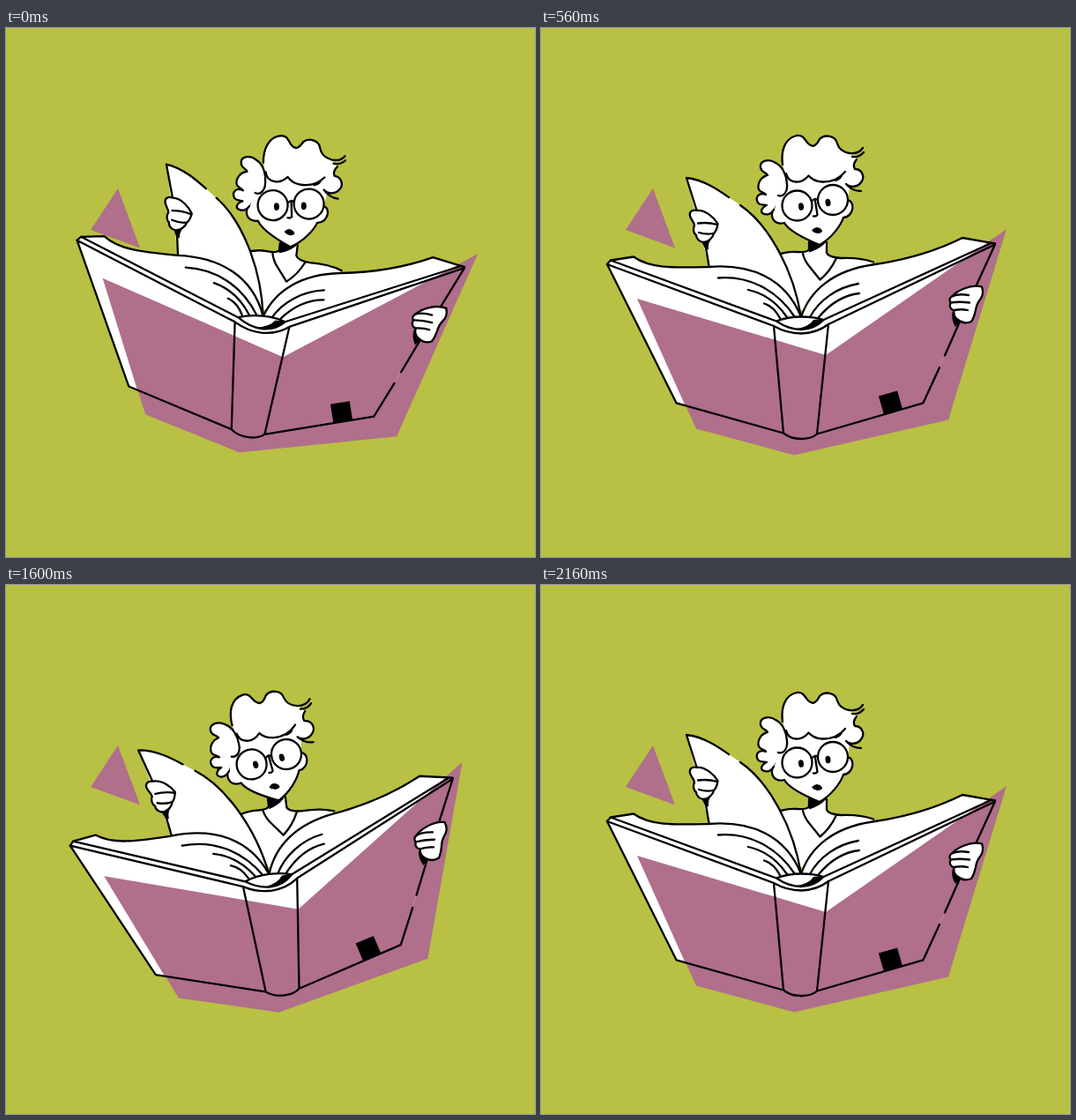
An HTML page for the animation above (2400 ms loop, 600 by 600 pixels).

```html
<!DOCTYPE html>
<html lang="en">
<head>
<meta charset="utf-8">
<title>Reader</title>
<style>
  html, body { margin: 0; width: 100%; height: 100%; overflow: hidden; background: #b8c143; }
  svg { display: block; width: 100%; height: 100%; }
  .ink { fill: none; stroke: #000; stroke-width: 2.3; stroke-linecap: round; stroke-linejoin: round; }
  .paper { fill: #fff; }
  .plum { fill: #b06f8b; }
</style>
</head>
<body>
<svg viewBox="0 0 600 600">
  <rect width="600" height="600" fill="#b8c143"/>
  <path id="shard" class="plum"/>

  <g id="figure">
    <path class="plum" d="M528 228L462 444.500L287 484.500L176 454.500L109 307L323 371Z"/>

    <g id="body">
      <path class="paper" d="M304 240V251Q302 255 290 254Q278 253 264 259L270 320H350L377 265.500Q362 260 340 261Q326 260 324 256V240Z"/>
      <path d="M303.500 240L316 246L326.500 237Q322 249 304 254.500Z"/>
      <path class="ink" d="M304 243V251Q302 255 290 254Q278 253 264 259M324 243V255Q326 260 340 261Q362 260 377 265.500M297 256Q299 264 304 270L316.500 285.500Q328 276 334.500 262"/>
    </g>

    <g id="head">
      <path class="paper ink" d="M274 203C264 198 259 211 264 218Q268 223 276 221C281 230 299 239 316 246C330 238 340 224 343 215C355 214 357 196 347 195"/>
      <path class="paper" d="M274 160L268 188L265 206L274 204L290 226L340 214L348 195L352 165Z"/>
      <path class="paper ink" d="M269 190C275 192 280 186 279 177C279 168 274 157 267 153.500C258 147 248 151 249 158C249.500 164 255 163 257 167C249 169 245 177 247 183C249 187 253 186 255 189C247 186 243 192 245.500 197C247 202 253 200 256 201C251 203 248 208 252 210.500C257 213 262 210 264 206"/>
      <path class="paper" d="M274 155C272 140 276 125 290 122C298 121 299 127 303 131C309 137 313 132 316 126C322 120 334 122 336 131C338 138 344 141 350 142L358 149Q353 155 356 160C364 160 368 169 363 175C359 181 350 181 346 177L345 165Q335 175 319 174.500Q309 174 303.500 167.500Q297 175 289.500 174.500Q280 174 278 165Z"/>
      <path class="ink" d="M274 155C272 140 276 125 290 122C298 121 299 127 303 131C309 137 313 132 316 126C322 120 334 122 336 131C338 138 344 141 350 142C358 143 363 139 365 136M353 146Q361 147 366 141M358 149Q353 155 356 160C364 160 368 169 363 175C359 181 350 181 346 177Q353 185 363 185M278 165Q280 174 289.500 174.500Q297 175 303.500 167.500Q309 174 319 174.500Q335 175 345 163M334 173Q340 171 341 167"/>
      <g class="ink">
        <circle class="paper" cx="290.500" cy="201.500" r="17"/>
        <circle class="paper" cx="331" cy="195" r="17"/>
        <path d="M307 197Q310 192 314 195M311 196L313.500 212Q312 214 309 213.500"/>
      </g>
      <g id="awed">
        <ellipse cx="295" cy="202.500" rx="3" ry="4.300" transform="rotate(-8 295 202.500)"/>
        <ellipse cx="325.500" cy="198" rx="3" ry="4.300" transform="rotate(-8 325.500 198)"/>
        <path d="M307 229.500Q311 224.500 315 226.500Q319 228 319 231Q316 234 312 232.500Q309 232 307 229.500Z"/>
      </g>
      <path id="glad" class="ink" d="M288.500 203.500Q295 197 300 202.500M322 200Q327 192 333 198M297.500 226Q315 236 329 223"/>
    </g>

    <path id="leaf" class="paper"/>
    <path id="leafLine" class="ink"/>
    <g id="leftHand">
      <path d="M182 242L195 237Q189 243 190 251L187 252Z"/>
      <path class="paper ink" d="M177 207C171 205.500 168 209 169 213C170 218 174 220 174 224C172 228 173 233 176 235C176 239 180 243 185 243C190 242 195 238 196 233C199 230 200 226 200.500 222C197 216 187 206 177 207Z"/>
      <path class="ink" d="M178 221.500Q189 220 200 223M179 232Q188 234.500 195 233"/>
    </g>

    <g id="book">
      <path class="paper" d="M75 268L153.500 425.300L275 459.500Q295 472 313 460.500L433.500 425.300L515 245.500L326 336Q295 355 264 338Z"/>
      <path class="paper" d="M75 268L79 263.500L105 259.500C124 273 150 272 190 271C238 267 278 284 295 328C305 297 332 275 376 268.500C415 263 450 252 478 238L515 244.500L326 336Q295 355 264 338Z"/>
      <path class="plum" d="M109 307L323 371L515 237.500V245.500L433.500 425.300L313 460.500Q295 472 275 459.500L163 427Z"/>
      <path class="ink" d="M75 268L79 263.500L105 259.500C124 273 150 272 190 271C238 267 278 284 295 328C305 297 332 275 376 268.500C415 263 450 252 478 238L515 244.500"/>
      <path class="ink" d="M201 283.500C235 281 267 296 288 328M235 297Q262 303 279 328M253 312.500Q264 316 271 329M360 290C336 294 315 309 305 328M361 301Q335 304 315 328"/>
      <path class="paper" d="M267 332.500Q280 327.500 295 327.500Q310 327.500 320.500 331Q310 342 295 342Q281 342 267 332.500Z"/>
      <path d="M288 341.500Q304 339 309 331Q315 330 320.500 331Q309 343 288 341.500Z"/>
      <path class="ink" d="M267 332.500Q280 327.500 295 327.500Q310 327.500 320.500 331Q310 342 295 342Q281 342 267 332.500L79 263.500M320.500 331L510.500 244"/>
      <path class="ink" d="M75 268L264 338Q279 346.500 295 346.500Q313 346 326 336L515 245.500L475 333M458 371.500L475 333M452 385L433.500 425.300L313 460.500Q307 466 295 466Q283 466 275 459.500L153.500 425.300L75 268M264 338L275 459.500M326 336L313 460.500"/>
      <rect x="-11" y="-11" width="22" height="22" transform="translate(396.500 425) rotate(-16)"/>
    </g>

    <g id="rightHand">
      <path d="M466.500 322Q465 331 470 339L476 333Z"/>
      <path class="paper ink" d="M466 304.500Q471 299 480 295.500Q491 291 500 293.500Q503 302 498 308Q494 313 493 320Q491 329 488 333Q480 336.500 473 331Q467 327 468.500 320.500Q462 318 464.500 311.500Q462 307 466 304.500Z"/>
      <path class="ink" d="M466 304.500Q473 301 485 303M464.500 311.500Q475 310 486 311.500M468.500 320Q477 318.500 484 320"/>
    </g>
  </g>
</svg>
<script>
  const LOOP = 2400;
  const el = id => document.getElementById(id);
  const set = (id, name, value) => el(id).setAttribute(name, value);
  const show = (id, on) => set(id, 'visibility', on ? 'visible' : 'hidden');

  const mid = 'rotate(0)';
  const big = 'translate(300 300) scale(1.1325) translate(-300 -300)';
  const tilt = a => `rotate(${a} 300 300)`;

  // One pose every 400 ms
  const poses = [tilt(7), mid, big, mid, tilt(-7), mid];

  const shards = {
    rest: 'M127 182L96 229L152 249.500Z',
    up: 'M143 161.500L106.500 203.500L159 231.500Z',
    down: 'M114 204L89 253.500L146.500 268Z'
  };

  // Two ways the loose page can stand: its fill and its lines
  const leaves = {
    high: [
      'M165 170C185 172 203 185 213 192L226 201C257 222 286 272 295 328L191 272Z',
      'M177 208L165 170C185 172 203 185 213 192M226 201C257 222 286 272 295 328M186 243L190.500 270'
    ],
    low: [
      'M137.500 194C160 194 178 201 190.500 207L202 214C239 230 281 271 295 328L176 272Z',
      'M154 230L137.500 194C160 194 178 201 190.500 207M202 214C239 230 281 271 295 328M171 264L175 271'
    ]
  };

  function shardAt(t) {
    if (t >= 160 && t < 560) return shards.up;
    if (t >= 1760 && t < 2160) return shards.down;
    return shards.rest;
  }

  function draw(t) {
    const pose = poses[Math.floor(t / 400)];
    const close = pose === big;
    const [fill, line] = close ? leaves.low : leaves.high;
    set('figure', 'transform', pose);
    set('shard', 'd', shardAt(t));
    set('shard', 'transform', close ? 'translate(-13 0) ' + big : mid);
    set('leaf', 'd', fill);
    set('leafLine', 'd', line);
    set('leftHand', 'transform', close ? 'translate(-18 21)' : mid);
    show('awed', !close);
    show('glad', close);
  }

  const start = performance.now();
  function tick() {
    draw((performance.now() - start) % LOOP);
    requestAnimationFrame(tick);
  }
  draw(0);
  requestAnimationFrame(tick);
</script>
</body>
</html>
```
